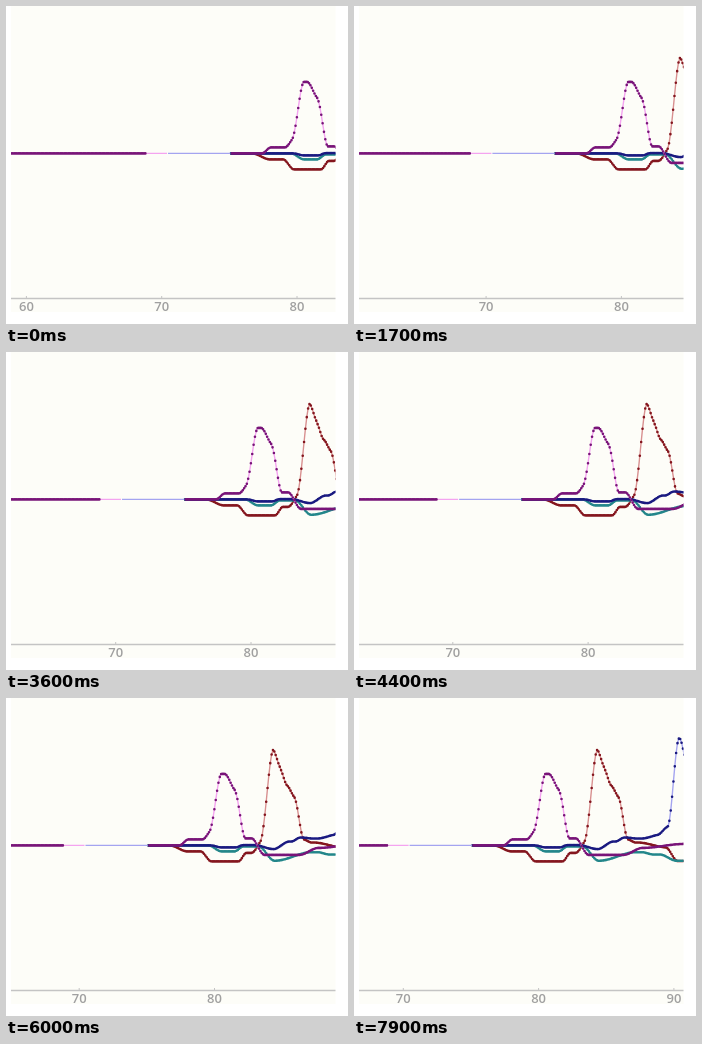
Write an HTML page that moves like this. It is 342 px wide and 318 px high and loops after 8000 ms.

```html
<!DOCTYPE html>
<html lang="en">
<head>
<meta charset="utf-8">
<title>Scrolling signal chart</title>
<style>
  html, body { margin: 0; width: 100%; height: 100%; overflow: hidden; background: #fff; }
  svg { display: block; }
  text { font: 600 13px "Open Sans", "Noto Sans", sans-serif; fill: #a0a0a0; text-anchor: middle; }
</style>
</head>
<body>
<svg width="342" height="318" viewBox="0 0 342 318">
  <clipPath id="view"><rect x="5" width="324.5" height="318"/></clipPath>
  <rect x="5" width="324.5" height="306" fill="#fdfdf8"/>
  <path d="M5 292.5H329.5" stroke="#c4c4c4" stroke-width="1.3"/>
  <g clip-path="url(#view)"><g id="plot" fill="none"></g></g>
</svg>
<script>
const NS = "http://www.w3.org/2000/svg";
const LOOP = 8000, TICK = 100;
const UNIT = 13.53, STEP = UNIT / 10;
const REST = 147.4, GAP = 140.5, SWITCH = 162, RESUME = 225, END = 437;

// each signal is a sum of eased moves: from x, to x, change in y
const signals = [
  { dot: "#84161e", line: "#d89090", from: RESUME, moves: [
    [246, 264, 6], [277, 288, 10], [315, 323, -8.5],
    [328, 341, -15], [337, 350, -88.4],
    [349, 358, 19], [356, 364, 17], [363, 372, 12], [370.5, 380.5, 42], [380, 388, 3],
    [390, 420, 5], [418, 430, 13.5]] },
  { dot: "#23868a", line: "#7cc4c4", from: RESUME, moves: [
    [285, 298, 6], [311, 320, -5], [335, 351, 14.3],
    [352, 388, -8.5], [394, 406, 2.3], [412, 429, 6.2]] },
  { dot: "#1a1a80", line: "#a4a4f0", from: SWITCH, moves: [
    [287, 298, 2], [312, 320, -2.3], [331, 350, 4], [350, 366, -7.6],
    [368, 377, -4], [377, 390, 1], [394, 414, -4], [410, 421, -8],
    [420, 431.5, -88], [432, 439, 22]] },
  { dot: "#781478", line: "#f4a4f0", from: 0, moves: [
    [256, 265, -6], [279, 289, -10], [286, 298, -55.5],
    [301, 313, 17], [311, 322, 47.5], [328, 341, 16.5],
    [376, 395, -7], [395, 437, -4]] }
];

const clamp = t => Math.min(1, Math.max(0, t));
const ease = t => t * t * (3 - 2 * t);
const level = (moves, x) => moves.reduce(
  (y, [a, b, dy]) => y + dy * ease(clamp((x - a) / (b - a))), REST);

const plot = document.getElementById("plot");
function add(tag, attrs) {
  const el = document.createElementNS(NS, tag);
  for (const key in attrs) el.setAttribute(key, attrs[key]);
  return plot.appendChild(el);
}

for (const { dot, line, from, moves } of signals) {
  let d = "", dots = "";
  for (let x = from; x <= END; x += STEP) {
    const p = x.toFixed(2) + " " + level(moves, x).toFixed(2);
    const hidden = from === 0 && x > SWITCH && x < RESUME;
    if (!hidden) d += (d && x - STEP >= from && !(from === 0 && x - STEP < RESUME && x >= RESUME) ? "L" : "M") + p;
    if (x < GAP || x >= RESUME) {
      if (x < GAP ? from === 0 : true) dots += "M" + p + "h.01";
    }
  }
  add("path", { d, stroke: line, "stroke-width": 1.4 });
  add("path", { d: dots, stroke: dot, "stroke-width": 2.6, "stroke-linecap": "round" });
}

const marks = [60, 70, 80, 90].map(value => {
  const x = 291 + (value - 80) * UNIT;
  const label = add("text", { x, y: 305 });
  label.textContent = value;
  return { x, els: [label, add("path", { d: `M${x} 290V293`, stroke: "#c4c4c4" })] };
});

// ticks at which the feed stalls, and key points of the scroll: moves made, distance
const stalls = [3, 5, 9, 20, 27, 31, 34, 35, 38, 39, 45, 62, 68, 69, 75];
const scroll = [[0, 0], [14, 23.6], [23, 37.3], [28, 46], [41, 69.6], [55, 92.2], [64, 106.4]];

function distance(moves) {
  const i = Math.max(1, scroll.findIndex(([n]) => n >= moves));
  const [n0, d0] = scroll[i - 1], [n1, d1] = scroll[i];
  return d0 + (d1 - d0) * (moves - n0) / (n1 - n0);
}

function draw(time) {
  const tick = Math.floor(time % LOOP / TICK);
  const shift = distance(tick - stalls.filter(s => s <= tick).length);
  plot.setAttribute("transform", `translate(${-shift.toFixed(2)} 0)`);
  for (const { x, els } of marks) {
    const shown = x - shift >= 5 && x - shift <= 329;
    for (const el of els) el.style.display = shown ? "" : "none";
  }
}

let start;
function frame(now) {
  start ??= now;
  draw(now - start);
  requestAnimationFrame(frame);
}
draw(0);
requestAnimationFrame(frame);
</script>
</body>
</html>
```
